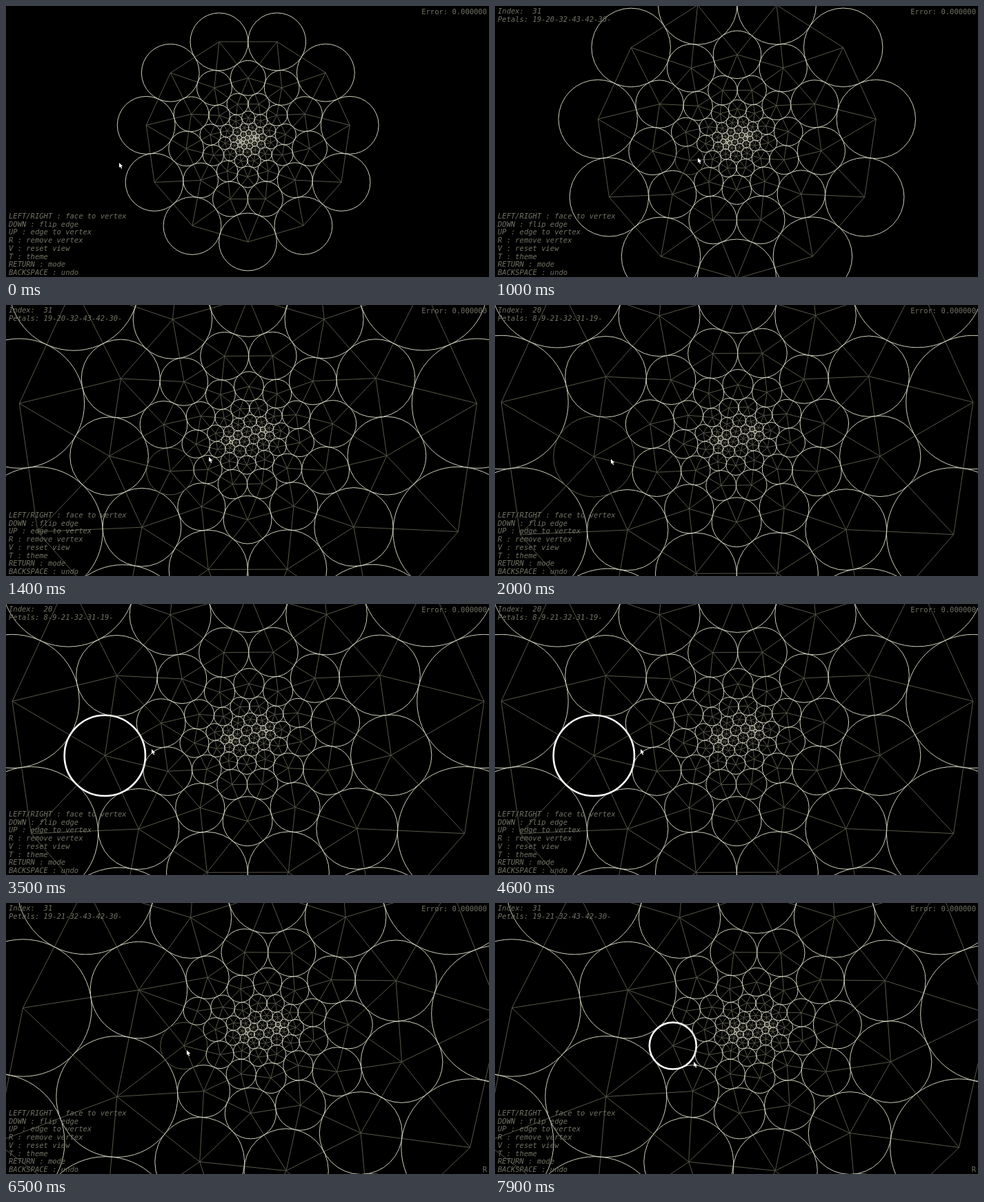
An HTML page with a canvas that plays this animation: 700 px wide and 394 px high, repeating every 8 s.

```html
<!DOCTYPE html>
<html lang="en">
<head>
<meta charset="utf-8">
<title>Circle packing</title>
<style>
  html, body { margin: 0; width: 100%; height: 100%; overflow: hidden; background: #000; }
  canvas { position: absolute; left: 0; top: 0; }
  pre {
    position: absolute; margin: 0; color: #737366;
    font: 10.5px/11.7px "DejaVu Sans Mono", "Liberation Mono", monospace;
  }
  #help { left: 4px; top: 300px; font-style: italic; }
  #info { left: 4px; top: 2px; font-style: italic; }
  #error { right: 3px; top: 2.5px; }
  #key { right: 3px; top: 381.5px; }
</style>
</head>
<body>
<canvas id="view" width="700" height="394"></canvas>
<pre id="info"></pre>
<pre id="error">Error: 0.000000</pre>
<pre id="help">LEFT/RIGHT : face to vertex
DOWN : flip edge
UP : edge to vertex
R : remove vertex
V : reset view
T : theme
RETURN : mode
BACKSPACE : undo</pre>
<pre id="key">R</pre>
<script>
const N = 11, LAST = 6, LOOP = 8000, STEP = 100, REMOVE_AT = 4900;
const EDGE = '#58584a', CIRCLE = '#cecebc', PICK = '#fff';
const el = id => document.getElementById(id);
const ctx = el('view').getContext('2d');

const id = (ring, j) => ring * N + (j + N) % N;

// Flowers (clockwise petals) of all interior vertices: rings of 11, closed by a zigzag strip.
function buildFlowers() {
  const zig = [0];
  for (let i = 1; i <= 5; i++) zig.push(i, N - i);
  const flowers = {};
  for (let k = 1; k <= LAST; k++) {
    for (let j = 0; j < N; j++) {
      const outer = [id(k - 1, j - 1), id(k - 1, j)];
      let rest;
      if (k < LAST) {
        rest = [id(k, j + 1), id(k + 1, j + 1), id(k + 1, j), id(k, j - 1)];
      } else {
        const p = zig.indexOf(j), turn = i => (i - j + N) % N;
        rest = [p - 2, p - 1, p + 1, p + 2].filter(i => i >= 0 && i < N)
          .map(i => zig[i]).sort((a, b) => turn(a) - turn(b)).map(i => id(k, i));
      }
      flowers[id(k, j)] = outer.concat(rest);
    }
  }
  return flowers;
}

function removeVertex20(flowers) {
  const next = {};
  const swap = { 19: [9, 21], 21: [31, 19], 31: [21] };
  for (const v in flowers) {
    if (v != 20) next[v] = flowers[v].flatMap(u => u === 20 ? swap[v] || [] : [u]);
  }
  return next;
}

function corner(r, a, b) {
  return 2 * Math.asin(Math.sqrt(a / (r + a) * b / (r + b)));
}

function solveRadii(flowers) {
  const r = [];
  for (let v = 0; v < N * (LAST + 1); v++) r[v] = 0.604 ** Math.floor(v / N);
  for (let pass = 0; pass < 1500; pass++) {
    let worst = 0;
    for (const v in flowers) {
      const f = flowers[v], k = f.length;
      let sum = 0;
      for (let i = 0; i < k; i++) sum += corner(r[v], r[f[i]], r[f[(i + 1) % k]]);
      const b = Math.sin(sum / (2 * k)), d = Math.sin(Math.PI / k);
      r[v] *= b / (1 - b) * (1 - d) / d;
      worst = Math.max(worst, Math.abs(sum - 2 * Math.PI));
    }
    if (worst < 1e-9) break;
  }
  return r;
}

function layOut(flowers, r) {
  const pos = [], queue = [N];
  const put = (u, v, angle) => {
    const d = r[u] + r[v];
    pos[u] = { x: pos[v].x + d * Math.cos(angle), y: pos[v].y + d * Math.sin(angle), r: r[u] };
    if (flowers[u]) queue.push(u);
  };
  pos[N] = { x: 0, y: 0, r: r[N] };
  put(flowers[N][0], N, 0);
  for (let q = 0; q < queue.length; q++) {
    const v = queue[q], f = flowers[v], k = f.length;
    const first = f.findIndex(u => pos[u]);
    const p = pos[f[first]];
    let angle = Math.atan2(p.y - pos[v].y, p.x - pos[v].x);
    for (let i = 1; i < k; i++) {
      const a = f[(first + i - 1) % k], b = f[(first + i) % k];
      angle += corner(r[v], r[a], r[b]);
      if (!pos[b]) put(b, v, angle);
    }
  }
  return pos;
}

// Similarity that takes vertex i to (x1, y1) and vertex j to (x2, y2).
function fit(pos, i, x1, y1, j, x2, y2) {
  const o = pos[i], dx = pos[j].x - o.x, dy = pos[j].y - o.y;
  const ex = x2 - x1, ey = y2 - y1, n = dx * dx + dy * dy;
  const a = (ex * dx + ey * dy) / n, b = (ey * dx - ex * dy) / n, s = Math.hypot(a, b);
  return pos.map(p => ({
    x: x1 + a * (p.x - o.x) - b * (p.y - o.y),
    y: y1 + b * (p.x - o.x) + a * (p.y - o.y),
    r: p.r * s
  }));
}

function makePacking(flowers, ...anchors) {
  return { flowers, disks: fit(layOut(flowers, solveRadii(flowers)), ...anchors) };
}

const full = buildFlowers();
const before = makePacking(full, 9, 202.7, 172.8, 3, 497.7, 172.8);
const after = makePacking(removeVertex20(full), 9, 24, 152, 4, 672, 355);

// time, x, y
const path = [
  [0, 164, 228], [100, 171, 230], [300, 171, 230], [800, 294, 221],
  [1600, 294, 221], [1900, 168, 224], [2400, 168, 224], [2800, 211, 211],
  [5700, 211, 211], [6300, 262, 214], [7000, 262, 214], [7500, 288, 231], [LOOP, 288, 231]
];
// start time, picked vertex, bold
const picks = [
  [0, null], [500, 20], [700, 31], [1800, 20], [2800, 20, true],
  [REMOVE_AT, null], [5900, 31], [7400, 31, true]
];

function cursorAt(t) {
  const n = path.findIndex(p => p[0] > t), [t0, x0, y0] = path[n - 1], [t1, x1, y1] = path[n];
  const u = (t - t0) / (t1 - t0), e = u * u * (3 - 2 * u);
  return [x0 + (x1 - x0) * e, y0 + (y1 - y0) * e];
}

function zoomAt(t) {
  return Math.exp(Math.min(0.8407, Math.max(0, 0.312 + (t - 1000) * 0.001245)));
}

function drawPacking({ flowers, disks }, zoom, pick, bold) {
  // The half pixel puts whole coordinates on pixel centres.
  const d = disks.map(p => ({
    x: 350.5 + (p.x - 350) * zoom, y: 197.5 + (p.y - 197) * zoom, r: p.r * zoom
  }));
  const line = (a, b) => { ctx.moveTo(d[a].x, d[a].y); ctx.lineTo(d[b].x, d[b].y); };
  ctx.lineWidth = 1;
  ctx.strokeStyle = EDGE;
  ctx.beginPath();
  for (let i = 0; i < N; i++) line(i, (i + 1) % N);
  for (const v in flowers) for (const u of flowers[v]) if (u < v) line(v, u);
  ctx.stroke();
  d.forEach((p, v) => {
    const picked = v === pick;
    ctx.strokeStyle = !picked ? CIRCLE : bold ? PICK : EDGE;
    ctx.lineWidth = picked && bold ? 2.6 : 1;
    ctx.beginPath();
    ctx.arc(p.x, p.y, p.r, 0, 2 * Math.PI);
    ctx.stroke();
  });
}

function drawCursor([x, y]) {
  ctx.fillStyle = '#fff';
  ctx.beginPath();
  for (const [dx, dy] of [[0, 0], [0, 7], [1.7, 5.6], [3, 8.6], [4.2, 8], [3, 5.2], [5.2, 5]]) {
    ctx.lineTo(x + dx, y + dy);
  }
  ctx.fill();
}

function frame(now) {
  const t = Math.floor(now % LOOP / STEP) * STEP;
  const removed = t >= REMOVE_AT, pack = removed ? after : before;
  const [, pick, bold] = picks.filter(p => p[0] <= t).pop();
  ctx.fillStyle = '#000';
  ctx.fillRect(0, 0, 700, 394);
  drawPacking(pack, removed ? 1 : zoomAt(t), pick, bold);
  drawCursor(cursorAt(t));
  el('info').textContent = pick === null ? '' :
    `Index:  ${pick}\nPetals: ${pack.flowers[pick].join('-')}-`;
  el('key').style.visibility = removed ? 'visible' : 'hidden';
  requestAnimationFrame(frame);
}
requestAnimationFrame(frame);
</script>
</body>
</html>
```
